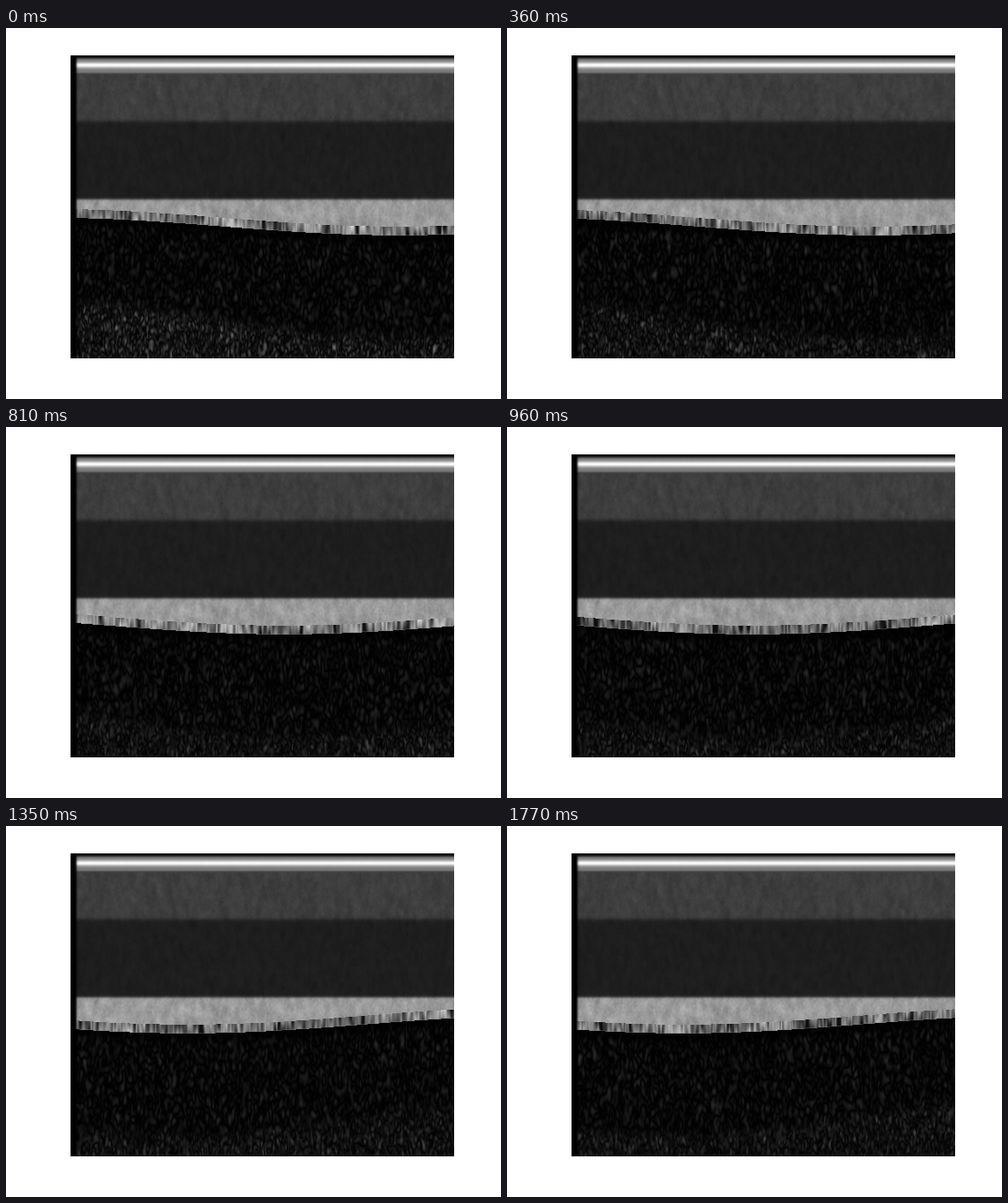
Animation of 560 by 420 pixels, one loop 1.8 s. Source, as a matplotlib script:

```python
import numpy as np
import matplotlib.pyplot as plt
from matplotlib.animation import FuncAnimation

W, H = 560, 420
LEFT, RIGHT, TOP, BOTTOM = 73, 507, 31, 374
FRAMES, STEP = 60, 30
BAND = 10
LEVEL = 234.8

x = np.arange(LEFT, RIGHT)
y = np.arange(TOP, BOTTOM)[:, None]
shape = (BOTTOM - TOP, RIGHT - LEFT)
fy = np.fft.fftfreq(shape[0])[:, None]
fx = np.fft.rfftfreq(shape[1])


def rise_at(v, centre, soft):
    """Smooth step from 0 to 1."""
    return 0.5 + 0.5 * np.tanh((v - centre) / (2 * soft))


def speckle(rng, sy, sx):
    """Gaussian-blurred noise with unit deviation."""
    blur = np.exp(-2 * np.pi**2 * ((sy * fy)**2 + (sx * fx)**2))
    field = np.fft.irfft2(np.fft.rfft2(rng.standard_normal(shape)) * blur, s=shape)
    return field / field.std()


def streaks(rng, width):
    """Blurred noise along the scan line."""
    k = np.exp(-0.5 * (np.arange(-30, 31) / width)**2)
    line = np.convolve(rng.standard_normal(x.size + 60), k, "valid")
    return line / line.std()


def make_layers():
    rng = np.random.default_rng(4)
    tone = (12 + 110 * rise_at(y, 34, 0.6)
            - 60 * rise_at(y, 50.5, 0.5)
            - 32 * rise_at(y, 105, 1.2)
            + 125 * rise_at(y, 193.5, 0.8))
    grain = 0.8 * speckle(rng, 4, 2) + 0.5 * speckle(rng, 1, 0.7)
    glow = 130 * np.exp(-((y - 41.5) / 3.2)**2)
    return tone * (1 + 0.05 * grain * rise_at(y, 52, 0.5)) + glow


layers = make_layers()
edge_fade = rise_at(x, 79.3, 0.6)


def render(i):
    rng = np.random.default_rng(100 + i)

    # The trough of the wave swings from right to left and starts back
    trough = 318 + 127 * np.cos(np.pi * i / 53)
    rise = 10 * (1 - np.cos(np.pi * (x - trough) / 400))
    low = np.round(LEVEL - rise)
    high = low - BAND

    # Dark depth and its brighter second echo, with doubled slope
    deep = 11 * np.abs(speckle(rng, 2.8, 1.3))
    deep *= np.clip((y - low) / 12, 0.35, 1)
    gain = 17 + 9 * np.exp(-i / 12)
    echo = gain * np.abs(speckle(rng, 2.2, 1))
    mix = rise_at(y, 350 - 2 * rise, 2.5)
    deep = deep * (1 - mix) + np.maximum(echo, deep) * mix

    # Streaky boundary
    tone = 148 - 48 * np.abs(streaks(rng, 1.5)) + 20 * streaks(rng, 9)
    slant = 20 * streaks(rng, 1.4)
    v = (y - high) / BAND
    band = np.clip(tone + slant * (2 * v - 1), 14, 215)
    band = np.where(y >= low - 1, 0.6 * band + 45, band)

    img = layers + 0.5 * speckle(rng, 2, 1)
    img = np.where(y >= high, band, img)
    img = np.where(y >= low, deep, img) * edge_fade
    stage = np.full((H, W), 255, np.uint8)
    stage[TOP:BOTTOM, LEFT:RIGHT] = np.clip(img, 0, 255)
    return stage


fig = plt.figure(figsize=(W / 100, H / 100), dpi=100, facecolor="white")
ax = fig.add_axes([0, 0, 1, 1])
ax.axis("off")
view = ax.imshow(render(0), cmap="gray", vmin=0, vmax=255,
                 interpolation="nearest", aspect="auto")


def update(i):
    view.set_data(render(i))
    return [view]


anim = FuncAnimation(fig, update, frames=FRAMES, interval=STEP,
                     repeat=True, repeat_delay=0, blit=False)
plt.show()
```
